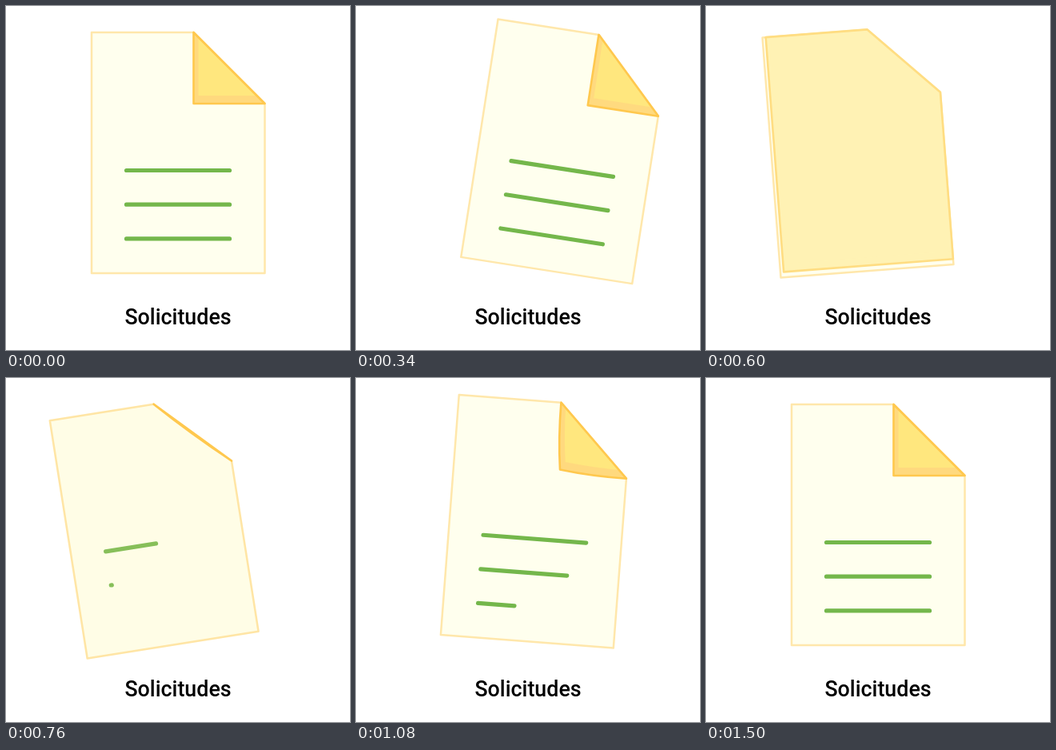
These frames come from a looping animation (430x430 px, 2000 ms). An HTML page:

```html
<!DOCTYPE html>
<html lang="es">
<head>
<meta charset="utf-8">
<title>Solicitudes</title>
<style>
  html, body { margin: 0; width: 100%; height: 100%; overflow: hidden; background: #fff; }
  svg { display: block; width: 100vw; height: 100vh; }
  text { font: 500 26.8px Roboto, Arial, sans-serif; text-anchor: middle; }
  #page { fill: #ffffee; stroke: #ffe7ab; stroke-width: 2.5; stroke-linejoin: round; }
  .edge { fill: none; stroke-width: 2.6; stroke-linejoin: round; }
  .row { stroke: #74b74b; stroke-width: 5.2; stroke-linecap: round; }
</style>
</head>
<body>
<svg viewBox="0 0 430 430">
  <defs>
    <clipPath id="coverClip"><path/></clipPath>
    <clipPath id="curlClip"><path/></clipPath>
  </defs>
  <g id="sheet">
    <path id="page"/>
    <line class="row"/>
    <line class="row"/>
    <line class="row"/>
    <g id="cover">
      <g clip-path="url(#coverClip)"><path class="band"/><path class="face" transform="translate(6 -10)"/></g>
      <path class="edge"/>
    </g>
    <g id="curl">
      <g clip-path="url(#curlClip)"><path class="band"/><path class="face" transform="translate(6 -10)"/></g>
      <path class="edge"/>
    </g>
  </g>
  <text x="215" y="398">Solicitudes</text>
</svg>
<script>
const LOOP = 2000, STEP = 20;
const LEFT = 107, TOP = 33, RIGHT = 323.5, BOTTOM = 334;
const FOLD = [234.5, 122];
const PALE = [255, 242, 181];

// turning points as [time, value]; the swing starts at full speed
const SWING = [[-314, -9], [314, 9], [746, -9], [1146, 5.3], [1500, 0]];
const DRIFT = [[314, 0], [530, -8], [750, 17], [1146, -15], [1500, 0]];
const BOB = [[260, -.5], [460, -4], [870, 2.6], [1150, -5.4], [1500, 0]];
const SWAY = 5.25; // sideways pixels per degree

const $ = s => document.querySelector(s);
const ramp = (t, from, to) => Math.max(0, Math.min(1, (t - from) / (to - from)));
const smooth = v => v * v * (3 - 2 * v);
const wave = v => .5 - .5 * Math.cos(Math.PI * v);
const mix = (a, b, k) => a.map((v, i) => v + (b[i] - v) * k);
const rgb = c => `rgb(${c.map(Math.round)})`;

// moves from each turning point to the next along half a cosine
const follow = (keys, t) => keys.reduce((value, [time, next], i) =>
  i ? value + (next - keys[i - 1][1]) * wave(ramp(t, keys[i - 1][0], time)) : next, 0);

function paint(id, d, pale, opacity) {
  const group = $('#' + id);
  group.setAttribute('opacity', opacity);
  for (const p of group.querySelectorAll('path')) p.setAttribute('d', d);
  $(`#${id}Clip path`).setAttribute('d', d);
  group.querySelector('.band').setAttribute('fill', rgb(mix([255, 217, 126], PALE, pale ** .55)));
  group.querySelector('.face').setAttribute('fill', rgb(mix([255, 231, 126], PALE, pale ** .8)));
  group.querySelector('.edge').setAttribute('stroke', rgb(mix([255, 200, 78], [255, 222, 132], pale)));
}

function coverPath(a, b, p) {
  const [x, y] = mix(FOLD, [LEFT, BOTTOM], p);
  return `M${a}H${x}V${y}H${RIGHT}L${b}Z`;
}

// round at first, a sharp corner at the end
function curlPath(a, b, u) {
  const mid = mix(a, b, .5), tip = mix(mid, FOLD, u);
  const pull = mix(mid, FOLD, Math.min(1, 2 * u));
  return `M${a}Q${mix(a, pull, .5)} ${tip}Q${mix(b, pull, .5)} ${b}Z`;
}

const rows = [...document.querySelectorAll('.row')];

function draw(t) {
  const angle = follow(SWING, t);
  const x = SWAY * angle + follow(DRIFT, t);
  const y = follow(BOB, t) * ramp(t, 0, 260);
  $('#sheet').setAttribute('transform', `translate(${x} ${y}) rotate(${angle} 215.3 183.5)`);

  const p = smooth(ramp(t, 335, 632));
  const u = smooth(ramp(t, 720, 1180));
  const slide = 4 * Math.sqrt(p) * (1 - u); // the crease moves outward while folding
  const a = [FOLD[0] + slide, TOP], b = [RIGHT, FOLD[1] - slide];

  $('#page').setAttribute('d', `M${LEFT} ${TOP}L${a}L${b}V${BOTTOM}H${LEFT}Z`);
  paint('cover', coverPath(a, b, p), p, 1 - ramp(t, 632, 780));
  paint('curl', curlPath(a, b, u), 0, u > 0 ? 1 : 0);

  rows.forEach((row, i) => {
    const start = 570 + i * 187, level = 205.5 + i * 42.7;
    const k = t < 580 ? 1 : ramp(t, start, start + 385);
    row.setAttribute('x1', 150.5);
    row.setAttribute('x2', 150.5 + 129 * k);
    row.setAttribute('y1', level);
    row.setAttribute('y2', level);
    row.setAttribute('visibility', k > 0 ? 'visible' : 'hidden');
  });
}

function tick() {
  draw(Math.floor(performance.now() % LOOP / STEP) * STEP);
  requestAnimationFrame(tick);
}
tick();
</script>
</body>
</html>
```
